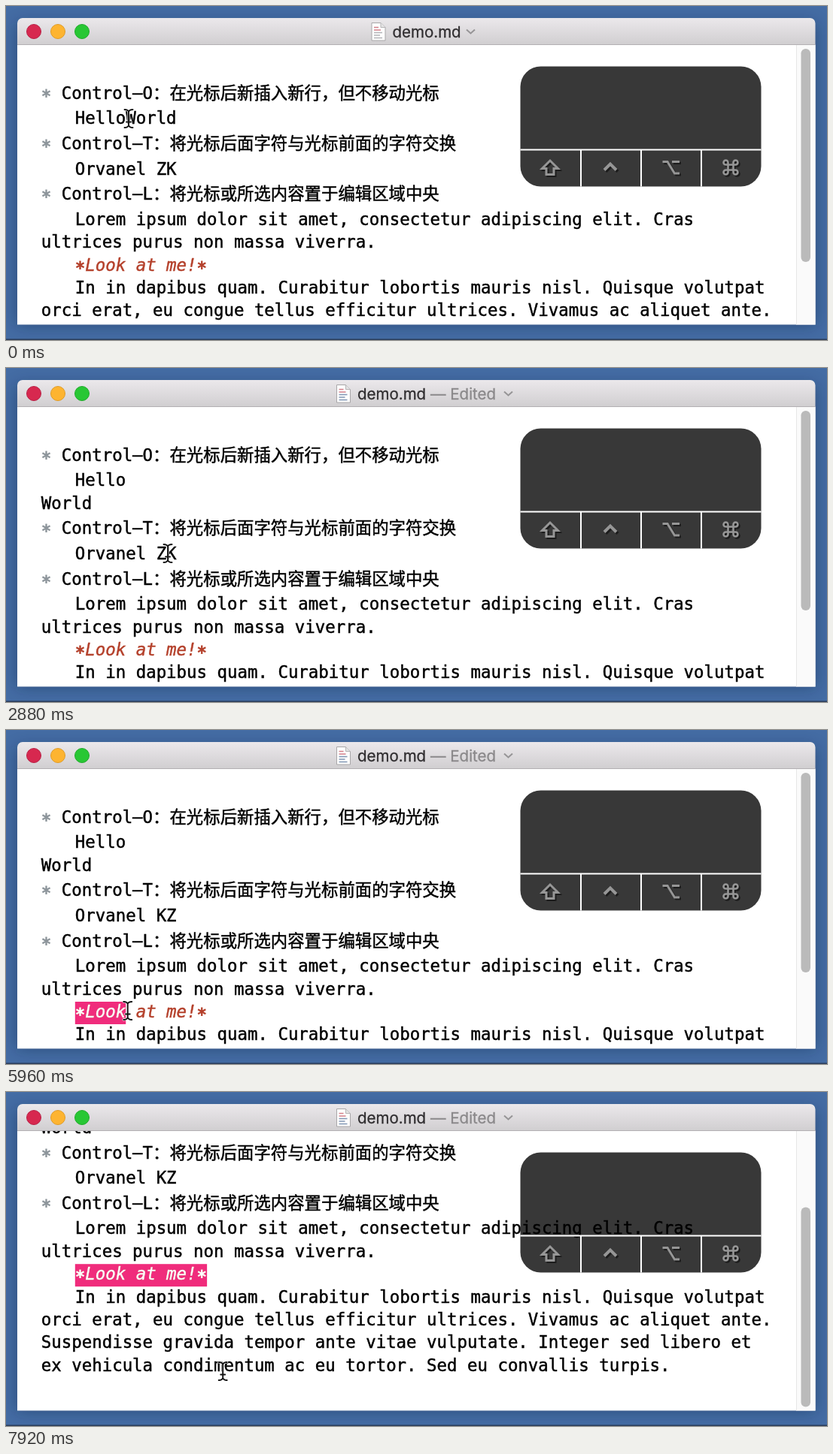
These frames come from a looping animation (1091 by 445 pixels, 8.48 s). An HTML page:

```html
<!DOCTYPE html>
<html lang="zh-CN">
<head>
<meta charset="utf-8">
<style>
html, body { margin: 0; width: 100%; height: 100%; overflow: hidden; background: #426a9f; }
svg { display: block; width: 1091px; height: 445px; }
text { white-space: pre; stroke-width: .45px; }
.body { font: 22.4px "DejaVu Sans Mono", "Noto Sans CJK SC", "Noto Sans CJK", monospace; }
.body text { stroke: #000; }
.body .em { font-style: italic; fill: #b4402b; stroke: #b4402b; }
.body .picked { font-style: italic; fill: #fff; stroke: #fff; }
.body .bullet { fill: #8d959b; stroke: #8d959b; }
.title { font: 20.5px Inter, Roboto, sans-serif; stroke-width: .3px; }
.line { fill: none; stroke-linejoin: miter; }
</style>
</head>
<body>
<svg viewBox="0 0 1091 445">
  <defs>
    <linearGradient id="bar" x2="0" y2="1">
      <stop offset="0" stop-color="#ebe8eb"/><stop offset="1" stop-color="#d0ced0"/>
    </linearGradient>
    <filter id="blur" x="-10%" y="-20%" width="120%" height="140%"><feGaussianBlur stdDeviation="10"/></filter>
    <clipPath id="page"><rect x="15" y="52" width="1060.500" height="372.500"/></clipPath>
    <clipPath id="pick"><rect id="pickClip" x="91.8" y="362" width="0" height="30"/></clipPath>
    <g id="keys" class="line">
      <path stroke-width="3" d="M723 206l10.5 10.5h-5.500v8h-10v-8h-5.500z"/>
      <path stroke-width="4" d="M795 218.500l8-8 8 8"/>
      <path stroke-width="3" d="M872.500 207.500h6.500l9.500 15.500h6.500M885 207.500h10"/>
      <path stroke-width="2.600" d="M959.500 211.500h7v7h-7zM959.500 211.500v-3a3 3 0 1 0-3 3zM966.500 211.500h3a3 3 0 1 0-3-3zM966.500 218.500v3a3 3 0 1 0 3-3zM959.500 218.500h-3a3 3 0 1 0 3 3z"/>
    </g>
    <path id="beam" d="M-5.500-12q4.500 0 5.500 3 1-3 5.500-3M0-9V9M-5.500 12q4.500 0 5.500-3 1 3 5.500 3M-3 4.500h6"/>
  </defs>

  <rect width="1091" height="445" fill="#446ca4"/>
  <rect x="13" y="22" width="1064" height="404" rx="8" fill="#0b1c38" opacity=".35" filter="url(#blur)"/>
  <rect y="443.500" width="1091" height="1.500" fill="#2b3d5a"/>

  <path d="M15 52V23a7 7 0 0 1 7-7h1046.500a7 7 0 0 1 7 7v29z" fill="url(#bar)"/>
  <path d="M15 51.500h1060.500" stroke="#b3b0b3"/>
  <g stroke-width="1">
    <circle cx="37" cy="34" r="9.500" fill="#d7284f" stroke="#b82146"/>
    <circle cx="69" cy="34" r="9.500" fill="#fdb431" stroke="#e09c28"/>
    <circle cx="101" cy="34" r="9.500" fill="#28c734" stroke="#20ab2b"/>
  </g>

  <g id="heading">
    <path d="M439.500 22.500h12l6 6v17.500h-18z" fill="#fdfdfd" stroke="#a9a7a9"/>
    <path d="M451.500 22.500v6h6" fill="#e4e4e4" stroke="#b5b3b5"/>
    <path d="M442.500 28.500h6M442.500 32h9" stroke="#d4808a" stroke-width="1.600"/>
    <path id="iconLines" d="M442.500 35.500h11M442.500 39h8M442.500 42.500h11" stroke-width="1.600"/>
    <text class="title" x="467" y="42" fill="#2f2d2f" stroke="#2f2d2f">demo.md</text>
    <text id="edited" class="title" x="564" y="42" fill="#8a888a" stroke="#8a888a">— Edited</text>
    <path id="chevron" class="line" d="M662 31.500l5.500 5 5.500-5" stroke="#969496" stroke-width="2"/>
  </g>

  <g clip-path="url(#page)">
    <rect x="15" y="52" width="1061" height="373" fill="#fff"/>
    <g id="doc" class="body">
      <g id="head"></g>
      <g id="tail">
        <rect id="selection" x="91.8" y="362" height="30" fill="#f02c7c"/>
      </g>
      <rect id="caret" width="2" height="30"/>
    </g>
    <rect x="1050" y="52" width="26" height="373" fill="#fafafa"/>
    <path d="M1050.500 52v373" stroke="#e6e6e6"/>
    <rect id="thumb" x="1056.500" width="12.500" rx="6.200" fill="#bababa"/>
  </g>

  <rect x="683.500" y="80.500" width="320" height="160" rx="27" fill="#000" fill-opacity=".78"/>
  <path d="M683.500 191.500h320M764 191.500v49M844 191.500v49M924 191.500v49" stroke="#fff" stroke-width="2"/>
  <use href="#keys" x="2" y="2" stroke="#1c1c1c"/>
  <use href="#keys" stroke="#969696"/>

  <g id="mouse" class="line" stroke-linecap="round">
    <use href="#beam" stroke="#fff" stroke-width="3.200"/>
    <use href="#beam" stroke="#111" stroke-width="1.900"/>
  </g>
</svg>
<script>
const LOOP = 8480, CELL = 13.486, LEFT = 46.8, INDENT = 91.8, LINE = 30.4, TALL = 33.6;
const CLICK_O = 500, SPLIT = 1100, CLICK_T = 2920, SWAP = 3800;
const PRESS = 5640, RELEASE = 6440, CENTER = 7400, SCROLL = 132.8;
const $ = id => document.getElementById(id);
const set = (node, attrs) => { for (const k in attrs) node.setAttribute(k, attrs[k]); };
const show = (node, on) => set(node, { visibility: on ? 'visible' : 'hidden' });

function make(tag, attrs, parent) {
  const node = document.createElementNS('http://www.w3.org/2000/svg', tag);
  set(node, attrs);
  return parent.appendChild(node);
}

// Asterisks sit lower than the font draws them.
function addLine(parent, text, x, y, cls = '') {
  const node = make('text', { x, y, class: cls }, parent);
  let low = false;
  for (const part of text.split(/(\*)/).filter(Boolean)) {
    const star = part === '*';
    const span = make('tspan', { dy: star === low ? 0 : star ? 4 : -4 }, node);
    if (star) set(span, { 'stroke-width': 1, class: cls || 'bullet' });
    span.textContent = part;
    low = star;
  }
  return node;
}

const lines = [
  '* Control–O：在光标后新插入新行，但不移动光标',
  '\tHello',
  'World',
  '* Control–T：将光标后面字符与光标前面的字符交换',
  '\tOrvanel ZK',
  '* Control–L：将光标或所选内容置于编辑区域中央',
  '\tLorem ipsum dolor sit amet, consectetur adipiscing elit. Cras',
  'ultrices purus non massa viverra.',
  '\t*Look at me!*',
  '\tIn in dapibus quam. Curabitur lobortis mauris nisl. Quisque volutpat',
  'orci erat, eu congue tellus efficitur ultrices. Vivamus ac aliquet ante.',
  'Suspendisse gravida tempor ante vitae vulputate. Integer sed libero et',
  'ex vehicula condimentum ac eu tortor. Sed eu convallis turpis.'
];
const isHeading = s => s.startsWith('* ');
const baselines = [];
const rows = lines.map((raw, i) => {
  const tall = i && (isHeading(raw) || isHeading(lines[i - 1]));
  const y = i ? baselines[i - 1] + (tall ? TALL : LINE) : 123.8;
  baselines.push(y);
  const text = raw.trim(), x = raw[0] === '\t' ? INDENT : LEFT;
  const parent = i < 3 ? $('head') : $('tail');
  const emphasis = text.startsWith('*L');
  const row = addLine(parent, text, x, y, emphasis ? 'em' : '');
  if (emphasis) {
    const group = make('g', { 'clip-path': 'url(#pick)' }, parent);
    addLine(group, text, x, y, 'picked');
  }
  return row;
});
const [, hello, world, , swapped] = rows;

// time, x, y
const path = [
  [0, 163, 150], [1300, 163, 150], [1560, 251, 238], [2200, 215, 247], [4560, 215, 247],
  [5200, 139, 377], [5480, 92, 375], [PRESS, 92, 375], [RELEASE, 289, 372], [LOOP, 288, 372]
];

function mouseAt(t) {
  const i = path.findIndex(p => p[0] > t);
  const [t0, x0, y0] = path[i - 1], [t1, x1, y1] = path[i];
  const u = (t - t0) / (t1 - t0), e = u * u * (3 - 2 * u);
  return [x0 + (x1 - x0) * e, y0 + (y1 - y0) * e];
}

// blink start, column, row
function caretAt(t) {
  if (t < CLICK_O || t >= PRESS) return null;
  if (t < SPLIT) return [CLICK_O, 5, 1];
  if (t < CLICK_T) return [SPLIT, 5, 1];
  if (t < SWAP) return [CLICK_T, 9, 4];
  return [SWAP, 10, 4];
}

function draw(t) {
  const split = t >= SPLIT, centered = t >= CENTER;

  set($('heading'), { transform: `translate(${split ? 0 : 46.5})` });
  show($('edited'), split);
  set($('chevron'), { transform: `translate(${split ? 0 : -96.5})` });
  set($('iconLines'), { stroke: split ? '#8196b4' : '#b4b4b8' });

  hello.firstChild.textContent = split ? 'Hello' : 'HelloWorld';
  show(world, split);
  swapped.firstChild.textContent = t < SWAP ? 'Orvanel ZK' : 'Orvanel KZ';
  set($('tail'), { transform: `translate(0 ${split ? 0 : -LINE})` });
  set($('doc'), { transform: `translate(0 ${centered ? -SCROLL : 0})` });
  set($('thumb'), { y: centered ? 153.5 : 57, height: split ? 266 : 284 });

  const [x, y] = mouseAt(t);
  set($('mouse'), { transform: `translate(${x} ${y})` });
  show($('mouse'), !(t >= SPLIT && t < 1300) && !(t >= SWAP && t < 4600));

  const count = t < PRESS ? 0 : Math.max(0, Math.min(13, Math.round((x - INDENT) / CELL)));
  set($('selection'), { width: count * CELL });
  set($('pickClip'), { width: count * CELL });

  const caret = caretAt(t);
  show($('caret'), caret && (t - caret[0]) % 1000 < 500);
  if (caret) set($('caret'), { x: INDENT + caret[1] * CELL - 0.8, y: baselines[caret[2]] - 21 });
}

const start = performance.now();
function tick() {
  draw((performance.now() - start) % LOOP);
  requestAnimationFrame(tick);
}
tick();
</script>
</body>
</html>
```
